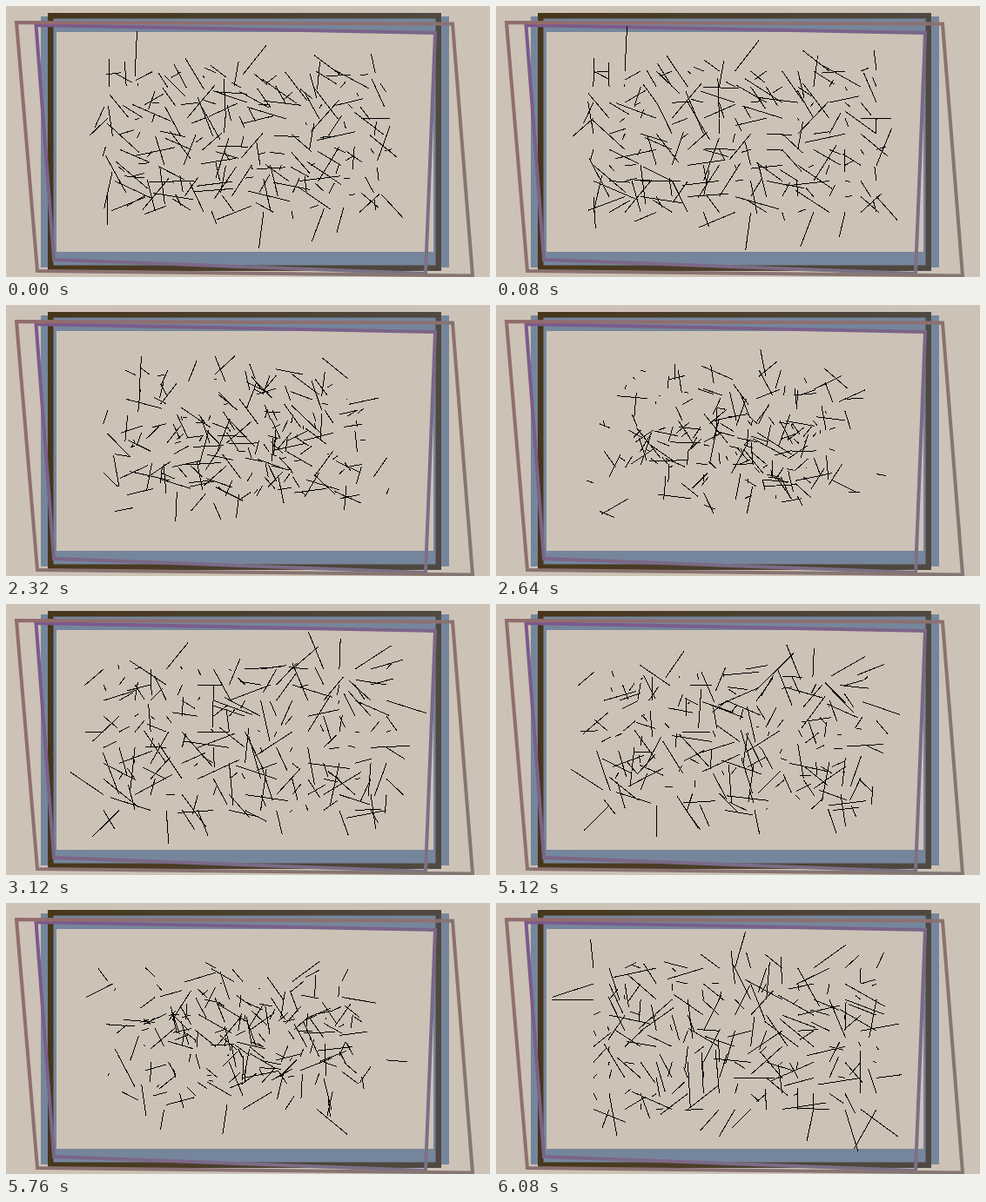
An HTML page for the animation above (8 s loop, 556 px wide and 312 px high).

```html
<!DOCTYPE html>
<html lang="en">
<head>
<meta charset="utf-8">
<title>Shuffled lines</title>
<style>
html, body { margin: 0; width: 100%; height: 100%; overflow: hidden; background: #cdc2b6; }
svg { display: block; fill: none; }
#lines { stroke: #000; shape-rendering: crispEdges; }
</style>
</head>
<body>
<svg width="556" height="312">
  <defs>
    <linearGradient id="dark">
      <stop stop-color="#47361b"/><stop offset="1" stop-color="#4f4942"/>
    </linearGradient>
    <linearGradient id="purple" x2="1" y2="1">
      <stop stop-color="#7b588c"/><stop offset="1" stop-color="#7c7184"/>
    </linearGradient>
    <linearGradient id="mauve" x2="1" y2="1">
      <stop stop-color="#926c6e"/><stop offset="1" stop-color="#847672"/>
    </linearGradient>
  </defs>
  <rect x="49" y="21" width="451" height="271" stroke="#75869c" stroke-width="18"/>
  <rect x="51.25" y="11.25" width="445.5" height="290.5" stroke="url(#dark)" stroke-width="6.5"/>
  <path d="M34.5 22L493 31L482 308L55 292Z" stroke="url(#purple)" stroke-width="4"/>
  <path d="M12 19L513 20.5L536 310.5L36 305Z" stroke="url(#mauve)" stroke-width="4"/>
  <path id="lines"/>
</svg>
<script>
const LOOP = 8000, STEP = 80;
// Each pose takes MOVE ms to reach, then rests; the loop begins LEAD ms into a move.
const PERIOD = 3000, MOVE = 1000, LEAD = 955;
const POSES = 4, COLS = 19, ROWS = 10, LEFT = 112, TOP = 75, GAP = 18.06;
const MIN_LENGTH = 3, MAX_LENGTH = 53;

function randomFrom(seed) {
  return () => {
    seed = (seed + 0x6D2B79F5) | 0;
    let v = Math.imul(seed ^ (seed >>> 15), 1 | seed);
    v = (v + Math.imul(v ^ (v >>> 7), 61 | v)) ^ v;
    return ((v ^ (v >>> 14)) >>> 0) / 4294967296;
  };
}

const rand = randomFrom(11);

function shuffle(list) {
  for (let i = list.length - 1; i > 0; i--) {
    const j = Math.floor(rand() * (i + 1));
    [list[i], list[j]] = [list[j], list[i]];
  }
  return list;
}

// One stroke of random direction and length from every grid point.
function makePose() {
  const strokes = Array.from({ length: COLS * ROWS }, (_, i) => {
    const x = LEFT + (i % COLS) * GAP;
    const y = TOP + Math.floor(i / COLS) * GAP;
    const angle = rand() * Math.PI * 2;
    const length = MIN_LENGTH + rand() * (MAX_LENGTH - MIN_LENGTH);
    return [x, y, x + Math.cos(angle) * length, y + Math.sin(angle) * length];
  });
  return shuffle(strokes);
}

const poses = Array.from({ length: POSES }, makePose);
const path = document.getElementById('lines');

function draw(time) {
  const clock = time + LEAD;
  const k = Math.floor(clock / PERIOD);
  const p = Math.min(1, (clock % PERIOD) / MOVE);
  path.setAttribute('d', poses[k].map((stroke, i) => {
    const [x1, y1, x2, y2] = stroke.map((v, n) => v + (poses[k + 1][i][n] - v) * p);
    return `M${x1} ${y1}L${x2} ${y2}`;
  }).join(''));
}

const start = performance.now();
function tick() {
  const time = (performance.now() - start) % LOOP;
  draw(Math.floor(time / STEP) * STEP);
  requestAnimationFrame(tick);
}
tick();
</script>
</body>
</html>
```
